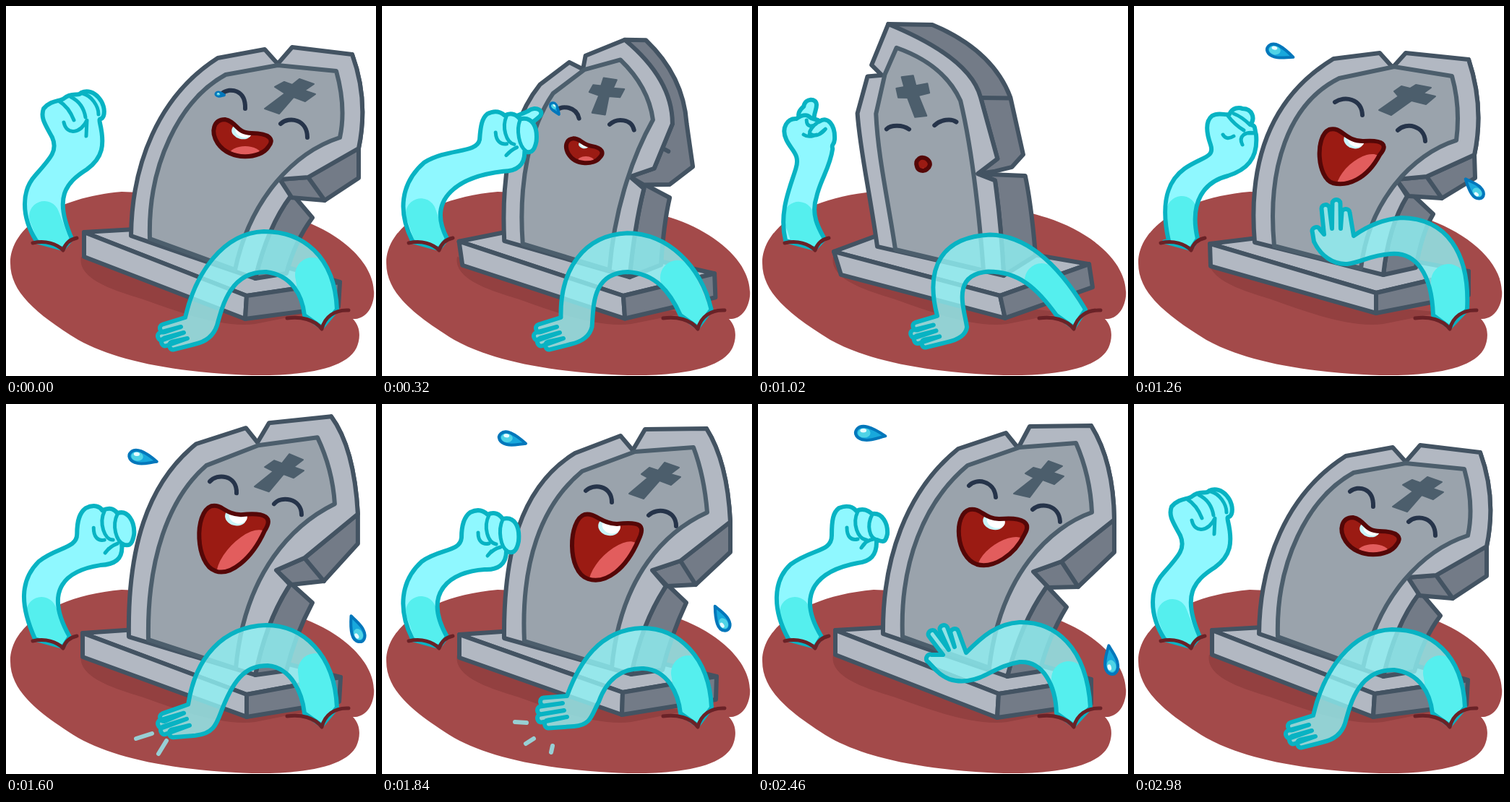
Write an HTML page that moves like this. It is 512 px wide and 512 px high and loops after 3000 ms.

```html
<!DOCTYPE html>
<html lang="en">
<head>
<meta charset="utf-8">
<title>Laughing tombstone</title>
<style>
html, body { margin: 0; width: 100%; height: 100%; overflow: hidden; background: #fff; }
svg { display: block; width: 100vw; height: 100vh; }
path, line { stroke-linejoin: round; stroke-linecap: round; }
</style>
</head>
<body>
<svg id="stage" viewBox="0 0 512 512"></svg>
<script>
const LOOP = 3000, BEAT = 228, FIRST_HIT = 1372, HITS = 6;
const INK = '#435362', SOFT_INK = '#4c5e6c', LIGHT = '#b2b8c2', DARK = '#737b87';
const CYAN = '#08b3c3', GLOW = '#8ff8ff', DEEP = '#55efee', CRACK = '#6a2227';

// Slab points: left top, left bottom, corner top, corner bottom, right top, right bottom, back.
const poses = {
  lean: {
    slab: '108 313 108 347 333 401 331 433 462 382 460 416 195 308',
    face: 'M173 318C174 220 210 125 293 72L358 60L376 80L396 57L479 67Q502 130 488 197L418 237L379 240L394 263Q362 305 345 377Z',
    panel: 'M199 322C196 220 240 130 304 95L376 82L457 90Q471 140 462 182C400 202 338 265 317 365Z',
    upper: 'M479 67L479 67Q502 130 488 197L488 238L441 269L394 265L379 240L418 237L488 197Z',
    lower: 'M379 240L424 293Q400 325 388 370L345 377Q362 305 394 263Z',
    crease: 'M418 237L441 269',
    cross: 'M406 101L426 108L413 117L428 122L414 132L398 126L378 149L358 142L386 121L372 112L385 105L396 109Z',
    eyes: 'M299 121C310 112 332 116 331 142M380 163C392 152 417 157 417 182',
    mouth: 'M303 157C320 160 318 176 340 176C365 176 372 185 363 195C352 212 310 215 293 190C282 173 288 157 303 157Z',
    tooth: 'translate(326 174) rotate(15) scale(14 10)',
    tongue: 'translate(331 206) rotate(0) scale(22 12)',
    armR: 'M458 420C455 345 410 312 357 312C300 314 262 370 248 431',
    hand: '248 431 218 446 242 444 215 457 246 452 220 465 251 460 231 470 261 468',
    tail: 'C280 464 288 454 292 442C300 412 312 367 360 368C395 372 410 400 413 428',
    deepR: 'M437 445L424 372',
    armL: 'M42 325C20 290 22 255 40 235C62 210 72 200 64 182C55 165 47 155 52 142C62 130 75 132 80 128C92 118 100 126 104 120C122 112 140 135 135 152C132 160 128 152 130 162C137 192 134 210 112 226C82 245 66 265 91 322',
    curl: 'M74 132C84 138 90 148 94 158M90 126C102 132 108 142 110 154M106 121C118 124 128 138 128 150M80 161C84 180 104 176 112 158L111 180',
    deepL: 'M74 345L53 291', knob: '90 150'
  },
  sigh: {
    slab: '105 340 115 372 335 401 342 432 458 357 463 389 185 310',
    face: 'M165 333C155 260 140 200 135 150L148 98L168 96L153 82L175 24Q290 70 305 125L330 211L303 232L327 241Q336 300 340 373Z',
    panel: 'M190 337C180 270 165 210 161 150L172 95L187 57Q254 80 277 130C295 200 305 280 312 366Z',
    upper: 'M175 24L237 25Q322 60 347 125L365 205L350 222L327 228L303 232L330 211L305 125Z',
    lower: 'M303 232L369 234Q378 275 384 345L340 373Q336 300 327 241Z',
    crease: 'M306 125L346 125',
    cross: 'M195 98L211 96L215 110L231 107L234 120L219 124L231 152L215 154L204 127L191 127L188 114L199 112Z',
    eyes: 'M176 171C182 165 198 165 207 171M242 165C250 157 265 155 272 160',
    mouth: 'M221 213C224 209 231 210 234 214C238 219 235 224 232 226C227 230 220 227 219 222C218 218 218 215 221 213Z',
    tooth: 'translate(227 212) rotate(0) scale(0 0)',
    tongue: 'translate(227 224) rotate(0) scale(0 0)',
    armR: 'M453 420C425 375 380 318 320 317C255 320 228 360 247 431',
    hand: '247 431 218 446 242 444 215 457 246 452 220 465 251 460 231 470 261 468',
    tail: 'C278 464 288 456 289 446C285 420 265 372 318 368C360 368 385 390 413 428',
    deepR: 'M442 450L392 380',
    armL: 'M38 325C28 285 45 250 52 225C58 205 45 200 38 185C30 168 40 155 52 156C58 152 64 150 68 152C76 160 80 155 84 160C95 152 106 165 105 185C104 195 100 190 102 198C98 225 85 240 80 265C72 290 85 310 92 322',
    curl: 'M62 178C68 182 74 180 80 178M66 158C66 168 74 168 80 162M84 160C76 164 72 170 70 174M70 176C78 182 86 178 92 170L84 177',
    deepL: 'M74 345L56 292', knob: '70 170'
  },
  squat: {
    slab: '105 329 106 360 335 397 335 425 463 367 463 400 195 318',
    face: 'M167 327C158 220 186 128 276 73L340 65L358 85L376 65L463 74Q485 140 471 206L405 236L363 240L378 263Q352 305 345 372Z',
    panel: 'M194 332C184 225 213 135 284 100L360 84L440 97Q452 140 446 186C385 205 325 270 314 363Z',
    upper: 'M463 74L463 74Q485 140 471 206L472 238L426 266L380 263L363 240L405 236L471 206Z',
    lower: 'M363 240L414 288Q398 315 390 362L345 372Q352 305 378 263Z',
    crease: 'M405 236L426 266',
    cross: 'M390 109L411 113L400 121L417 125L404 136L384 131L356 151L339 144L366 125L360 118L370 111L382 114Z',
    eyes: 'M278 133C291 124 315 128 316 151M365 172C377 160 402 166 403 187',
    mouth: 'M270 171C288 166 292 188 318 187C345 185 352 192 340 206C322 240 295 250 275 245C253 238 250 180 270 171Z',
    tooth: 'translate(304 186) rotate(20) scale(14 11)',
    tongue: 'translate(311 234) rotate(-42) scale(38 19)',
    armR: 'M461 420C465 340 432 294 370 293C345 295 325 303 304 318',
    hand: '304 318 293 286 286 308 280 273 274 308 265 280 263 316 252 311 249 326',
    tail: 'C258 345 275 358 295 357C315 355 325 345 355 343C390 340 412 370 414 428',
    deepR: 'M438 450L435 381',
    armL: 'M48 325C38 280 42 245 70 225C95 208 112 210 106 192C100 175 98 160 108 152C118 146 126 152 132 150C136 140 146 140 150 142C164 142 168 156 161 164C170 166 166 170 169 178C172 212 155 227 130 235C98 243 76 270 88 322',
    curl: 'M123 178C126 184 132 184 138 180M130 152C136 160 142 166 152 172M138 149C146 152 154 158 160 164M150 192C144 180 154 173 168 176L156 176',
    deepL: 'M70 345L66 284', knob: '135 180'
  },
  stretch: {
    slab: '106 317 106 350 333 402 333 433 463 378 461 412 195 311',
    face: 'M170 322C168 200 195 110 263 55L332 33L348 53L364 26L450 17Q482 60 487 152L413 213L374 230L393 250Q360 300 345 375Z',
    panel: 'M197 326C195 215 225 130 277 85L349 57L431 46Q452 90 455 138C400 165 330 230 318 366Z',
    upper: 'M450 17L450 17Q482 60 487 152L487 193L440 245L395 250L374 230L413 213L487 152Z',
    lower: 'M374 230L424 275Q400 320 388 369L345 375Q360 300 393 250Z',
    crease: 'M413 213L440 245',
    cross: 'M392 69L411 77L398 87L412 92L398 102L384 97L364 121L344 114L370 93L358 87L371 78L382 82Z',
    eyes: 'M282 107C292 95 320 98 319 123M371 138C380 126 409 130 409 153',
    mouth: 'M284 141C300 138 302 152 325 153C360 149 370 157 358 175C340 215 310 238 290 231C262 222 260 150 284 141Z',
    tooth: 'translate(318 156) rotate(15) scale(15 12)',
    tongue: 'translate(327 210) rotate(-46) scale(46 21)',
    armR: 'M458 420C455 345 410 306 360 306C300 308 262 350 252 416',
    hand: '252 416 218 434 246 428 215 443 250 436 219 452 254 445 231 456 262 459',
    tail: 'C290 456 292 440 300 420C318 375 335 362 362 362C395 365 410 400 413 428',
    deepR: 'M437 448L428 369',
    armL: 'M40 325C20 280 18 245 45 218C70 198 98 200 98 180C98 160 102 150 110 144C122 138 130 142 133 147C145 142 150 146 154 151C168 146 178 162 177 180C174 198 168 196 160 194C162 215 150 222 130 223C85 230 50 255 88 322',
    curl: 'M121 171C121 184 127 190 136 188M136 148C128 165 136 188 148 188M154 152C146 168 152 190 163 194M154 193C146 196 142 199 137 206L142 200',
    deepL: 'M72 345L49 288', knob: '130 180'
  },
  drop: {
    slab: '107 319 107 351 333 399 332 430 463 377 462 409 195 313',
    face: 'M169 324C168 210 190 115 267 68L330 44L347 64L364 35L449 34Q478 80 482 163L413 217L374 230L393 252Q360 302 345 374Z',
    panel: 'M197 328C192 220 220 140 277 93L350 66L431 60Q446 100 450 150C395 175 330 235 318 365Z',
    upper: 'M449 34L449 34Q478 80 482 163L482 205L434 250L395 252L374 230L413 217L482 163Z',
    lower: 'M374 230L421 275Q400 320 388 368L345 374Q360 302 393 252Z',
    crease: 'M413 217L434 250',
    cross: 'M391 81L411 88L399 97L413 101L400 112L384 106L362 131L342 124L368 102L359 97L370 88L382 92Z',
    eyes: 'M282 120C292 110 318 112 318 136M369 154C380 143 407 146 407 169',
    mouth: 'M280 153C296 150 302 165 325 166C358 162 365 168 355 188C338 228 310 250 285 242C255 232 258 160 280 153Z',
    tooth: 'translate(314 170) rotate(15) scale(15 12)',
    tongue: 'translate(321 224) rotate(-44) scale(44 20)',
    armR: 'M456 420C453 350 410 310 360 310C300 312 272 360 256 404',
    hand: '256 404 224 412 250 414 220 424 252 424 220 435 256 433 230 443 266 446',
    tail: 'C290 444 290 430 300 412C312 378 335 365 362 366C395 368 410 400 413 428',
    deepR: 'M437 447L424 372',
    armL: 'M42 325C22 285 25 245 55 218C80 200 108 205 110 185C110 165 115 155 122 150C134 144 142 149 146 153C156 148 163 153 167 159C184 155 191 170 189 190C186 206 180 207 172 204C172 222 160 230 142 229C95 232 55 260 90 322',
    curl: 'M133 178C133 190 139 195 148 193M148 154C140 170 146 192 158 194M167 160C160 175 164 198 174 204M164 198C156 200 151 204 146 210L151 204',
    deepL: 'M74 345L54 287', knob: '145 188'
  },
  rise: {
    slab: '107 313 107 347 333 401 331 434 461 381 461 415 195 308',
    face: 'M173 318C172 215 205 120 277 62L343 40L360 61L376 31L461 30Q492 80 493 160L420 218L381 232L400 252Q364 302 345 377Z',
    panel: 'M200 322C196 220 230 135 290 85L362 60L440 54Q460 100 462 150C405 170 335 235 320 365Z',
    upper: 'M461 30L461 30Q492 80 493 160L493 205L443 253L402 254L381 232L420 218L493 160Z',
    lower: 'M381 232L427 281Q402 322 390 370L345 377Q364 302 400 252Z',
    crease: 'M420 218L443 253',
    cross: 'M402 79L421 86L408 95L423 100L410 111L394 105L376 129L354 124L382 102L370 96L381 88L392 91Z',
    eyes: 'M292 113C302 102 327 106 329 129M380 146C392 135 417 140 418 163',
    mouth: 'M293 146C308 143 314 160 335 159C368 156 378 165 369 180C355 210 325 228 303 222C273 212 270 152 293 146Z',
    tooth: 'translate(326 163) rotate(15) scale(15 11)',
    tongue: 'translate(337 210) rotate(-34) scale(38 18)',
    armR: 'M460 420C455 335 410 301 362 302C330 304 310 322 288 344',
    hand: '288 344 272 316 272 336 257 311 264 340 241 318 256 347 238 352 246 368',
    tail: 'C258 380 270 385 290 383C315 380 330 362 362 357C395 355 412 390 413 428',
    deepR: 'M437 449L430 380',
    armL: 'M42 325C20 285 20 245 45 222C75 200 102 205 102 182C102 160 104 150 112 144C124 139 132 143 136 148C146 143 153 148 158 152C172 150 180 165 179 180C176 194 172 190 164 188C165 210 155 218 138 220C85 230 50 260 88 322',
    curl: 'M123 171C123 184 129 189 138 187M138 149C130 165 138 187 150 188M158 153C150 168 154 186 165 188M160 187C152 188 147 192 143 199L148 193',
    deepL: 'M74 345L51 288', knob: '132 180'
  },
  wipe: {
    armL: 'M42 325C22 285 25 245 60 215C95 195 135 205 140 185C142 165 145 155 152 150C164 144 172 149 176 153C186 148 193 153 197 159C214 155 221 170 219 190C216 206 210 207 202 204C202 222 190 230 172 229C110 235 60 265 90 322',
    curl: 'M163 178C163 190 169 195 178 193M178 154C170 170 176 192 188 194M197 160C190 175 194 198 204 204M194 198C186 200 181 204 176 210L181 204',
    deepL: 'M74 345L54 287',
    finger: 'M172 165C180 156 200 150 210 145C222 136 236 146 226 154C218 162 205 168 200 175'
  }
};
poses.sigh.finger = 'M58 160C50 148 58 142 62 138C64 126 80 126 80 136C80 146 74 148 78 164';
// A folded finger collapses to a point inside the fist.
for (const p of Object.values(poses)) {
  p.finger ??= 'M' + p.knob + ('C' + Array(3).fill(p.knob).join(' ')).repeat(3);
}

const laugh = [];
for (let i = 0; i < HITS; i++) {
  const hit = FIRST_HIT + i * BEAT;
  laugh.push([hit - 112, 'squat'], [hit - 52, 'rise'], [hit, 'stretch'], [hit + 12, 'drop']);
}
laugh.push([2628, 'squat'], [2880, 'lean'], [LOOP, 'lean']);
const bodyKeys = [[0, 'lean'], [100, 'lean'], [560, 'sigh'], [1000, 'sigh'], ...laugh];
const leftKeys = [[0, 'lean'], [380, 'wipe'], [660, 'sigh'], [1000, 'sigh'], ...laugh];

const stage = document.getElementById('stage');
function add(tag, attrs, parent = stage) {
  const el = document.createElementNS('http://www.w3.org/2000/svg', tag);
  for (const k in attrs) el.setAttribute(k, attrs[k]);
  parent.append(el);
  return el;
}
const shape = (fill, stroke, width = 6, d = '', parent = stage) =>
  add('path', { d, fill, stroke, 'stroke-width': width }, parent);
const clip = id => shape('#000', 'none', 0, '', add('clipPath', { id }));

shape('#a34a4a', 'none', 0, 'M6 356C6 305 70 265 160 257C250 260 345 275 400 293C465 314 513 358 509 402C506 425 492 434 480 433C492 445 490 462 485 473C470 505 400 512 340 511C230 507 150 490 100 462C40 425 6 395 6 356Z');
shape('#934040', 'none', 0, 'M104 347C98 378 150 394 190 406C240 424 300 446 345 440L425 424L335 415Z');
const slabTop = shape(LIGHT, INK), slabFront = shape(LIGHT, INK), slabSide = shape(DARK, INK);
const body = {
  lower: shape(DARK, INK), upper: shape(DARK, INK), crease: shape('none', INK),
  face: shape(LIGHT, INK), panel: shape('#9aa3ac', SOFT_INK),
  cross: shape(SOFT_INK, SOFT_INK, 2), eyes: shape('none', '#26344a')
};
const mouthClip = clip('mouthClip');
const mouthFill = shape('#9b1b13', 'none', 0);
const inMouth = add('g', { 'clip-path': 'url(#mouthClip)' });
const tongue = add('circle', { r: 1, fill: '#e25d5d' }, inMouth);
const tooth = add('g', {}, inMouth);
add('circle', { r: 1, fill: '#c9f4f8' }, tooth);
add('circle', { r: .85, cx: .2, cy: -.15, fill: '#fff' }, tooth);
const mouthLine = shape('none', '#550707');

const leftClip = clip('leftClip');
const finger = shape(GLOW, CYAN), leftFill = shape(GLOW, 'none');
const leftDeep = shape('none', DEEP, 42, '', add('g', { 'clip-path': 'url(#leftClip)' }));
const leftLine = shape('none', CYAN), curl = shape('none', CYAN, 5);

const rightClip = clip('rightClip');
const rightFill = shape('#90f3f5', 'none');
rightFill.setAttribute('fill-opacity', .8);
const rightDeep = shape('none', DEEP, 48, '', add('g', { 'clip-path': 'url(#rightClip)' }));
const rightLine = shape('none', CYAN);

shape('none', CRACK, 5, 'M37 328C55 324 70 329 79 338C82 329 88 323 98 321');
shape('none', CRACK, 5, 'M389 432C408 429 427 434 437 447C441 430 455 420 474 421');
const sparks = ['M180 463L202 456M211 484L222 466', 'M184 440L200 441M199 470L210 463M234 482L236 473']
  .map(d => shape('none', '#98cfd4', 6, d));

function makeDrop() {
  const g = add('g', {});
  const d = 'M20 4C8 7 2 10 -6 9C-16 8 -21 1 -16 -5C-10 -12 2 -8 20 4Z';
  shape('#18a8dc', '#0277bb', 4, d, g).setAttribute('vector-effect', 'non-scaling-stroke');
  add('ellipse', { cx: -7, cy: 0, rx: 8, ry: 6, fill: '#4fd3e6' }, g);
  add('ellipse', { cx: -8, cy: -3, rx: 4, ry: 2.5, fill: '#e8fbff' }, g);
  return g;
}
const tear = makeDrop(), leftDrop = makeDrop(), rightDrop = makeDrop();

const NUM = /-?\d+(?:\.\d+)?/g;
const nums = s => s.match(NUM).map(Number);
const smooth = u => u * u * (3 - 2 * u);
function mix(a, b, u) {
  const to = nums(b);
  let i = 0;
  return a.replace(NUM, n => (+n + (to[i++] - n) * u).toFixed(2));
}
function span(keys, t) {
  let i = 0;
  while (i < keys.length - 2 && t >= keys[i + 1][0]) i++;
  const [a, b] = [keys[i], keys[i + 1]];
  return [a, b, Math.min(1, Math.max(0, (t - a[0]) / (b[0] - a[0])))];
}
function poser(keys, t) {
  const [a, b, u] = span(keys, t);
  return part => mix(poses[a[1]][part], poses[b[1]][part], smooth(u));
}
function track(keys, t) {
  const [a, b, u] = span(keys, t);
  return a.slice(1).map((v, i) => v + (b[i + 1] - v) * u);
}
const setD = (d, ...els) => els.forEach(el => el.setAttribute('d', d));

// Four rounded fingers, each between two valleys.
function fingers(list) {
  const r = 5.5;
  let d = '';
  for (let i = 0; i < 16; i += 4) {
    const [ax, ay, x, y, bx, by] = list.slice(i, i + 6);
    const dx = x - (ax + bx) / 2, dy = y - (ay + by) / 2, len = Math.hypot(dx, dy) || 1;
    const ux = dx / len * r, uy = dy / len * r;
    d += `L${x - uy} ${y + ux}C${x - uy + ux * 1.2} ${y + ux + uy * 1.2} ${x + uy + ux * 1.2} ${y - ux + uy * 1.2} ${x + uy} ${y - ux}L${bx} ${by}`;
  }
  return d;
}

// Columns: time, x, y, size, angle.
const tearKeys = [[0, 296, 122, .3, 0], [90, 294, 124, .4, 0], [380, 226, 146, .5, 60], [660, 72, 126, .4, 90],
  [740, 72, 126, .4, 90], [880, 6, 60, .6, 40], [930, -25, 50, .6, 20]];
const leftFlight = [[0, 282, 128, .1, 35], [80, 202, 63, 1, 12], [140, 180, 48, 1, 8], [240, 155, 40, 1.15, 0], [260, 145, 40, 0, 0]];
const rightFlight = [[0, 412, 195, .1, 215], [80, 470, 253, .9, 220], [160, 484, 312, 1, 240], [240, 487, 355, 1.1, 254], [260, 488, 366, 0, 258]];

function place(el, keys, t, shown, dx = 0, dy = 0) {
  el.style.display = shown ? '' : 'none';
  const [x, y, s, r] = track(keys, t);
  el.setAttribute('transform', `translate(${x + dx} ${y + dy}) rotate(${r}) scale(${s})`);
}

function draw(t) {
  const at = poser(bodyKeys, t), left = poser(leftKeys, t);
  const [ax, ay, bx, by, cx, cy, dx, dy, ex, ey, fx, fy, gx, gy] = nums(at('slab'));
  setD(`M${ax} ${ay}L${gx} ${gy}L${ex} ${ey}L${cx} ${cy}Z`, slabTop);
  setD(`M${ax} ${ay}L${cx} ${cy}L${dx} ${dy}L${bx} ${by}Z`, slabFront);
  setD(`M${cx} ${cy}L${ex} ${ey}L${fx} ${fy}L${dx} ${dy}Z`, slabSide);
  for (const part in body) setD(at(part), body[part]);
  setD(at('mouth'), mouthClip, mouthFill, mouthLine);
  tooth.setAttribute('transform', at('tooth'));
  tongue.setAttribute('transform', at('tongue'));

  setD(left('armL') + 'L79 336L42 326Z', leftClip, leftFill, leftLine);
  setD(left('curl'), curl);
  setD(left('finger'), finger);
  setD(left('deepL'), leftDeep);
  finger.style.display = t > 60 && t < 1220 ? '' : 'none';

  setD(at('armR') + fingers(nums(at('hand'))) + at('tail') + 'L437 445Z', rightClip, rightFill, rightLine);
  setD(at('deepR'), rightDeep);

  const hit = Math.floor((t - FIRST_HIT + 10) / BEAT), age = t - FIRST_HIT - hit * BEAT;
  sparks.forEach((el, i) => {
    const on = hit >= 0 && hit < HITS && age < 70 && (hit + 1) % 2 === i;
    el.style.display = on ? '' : 'none';
  });

  const since = t - 1180, k = Math.floor(since / 260), life = since - k * 260;
  const flying = k >= 0 && k < 6, odd = k % 2;
  place(tear, tearKeys, t, t < 930);
  place(leftDrop, leftFlight, life, flying, odd ? 14 : 0, odd ? 27 : 0);
  place(rightDrop, rightFlight, life, flying, k % 4 === 2 ? -12 : 0);
}

const start = performance.now();
function tick() {
  draw((performance.now() - start) % LOOP);
  requestAnimationFrame(tick);
}
tick();
</script>
</body>
</html>
```
